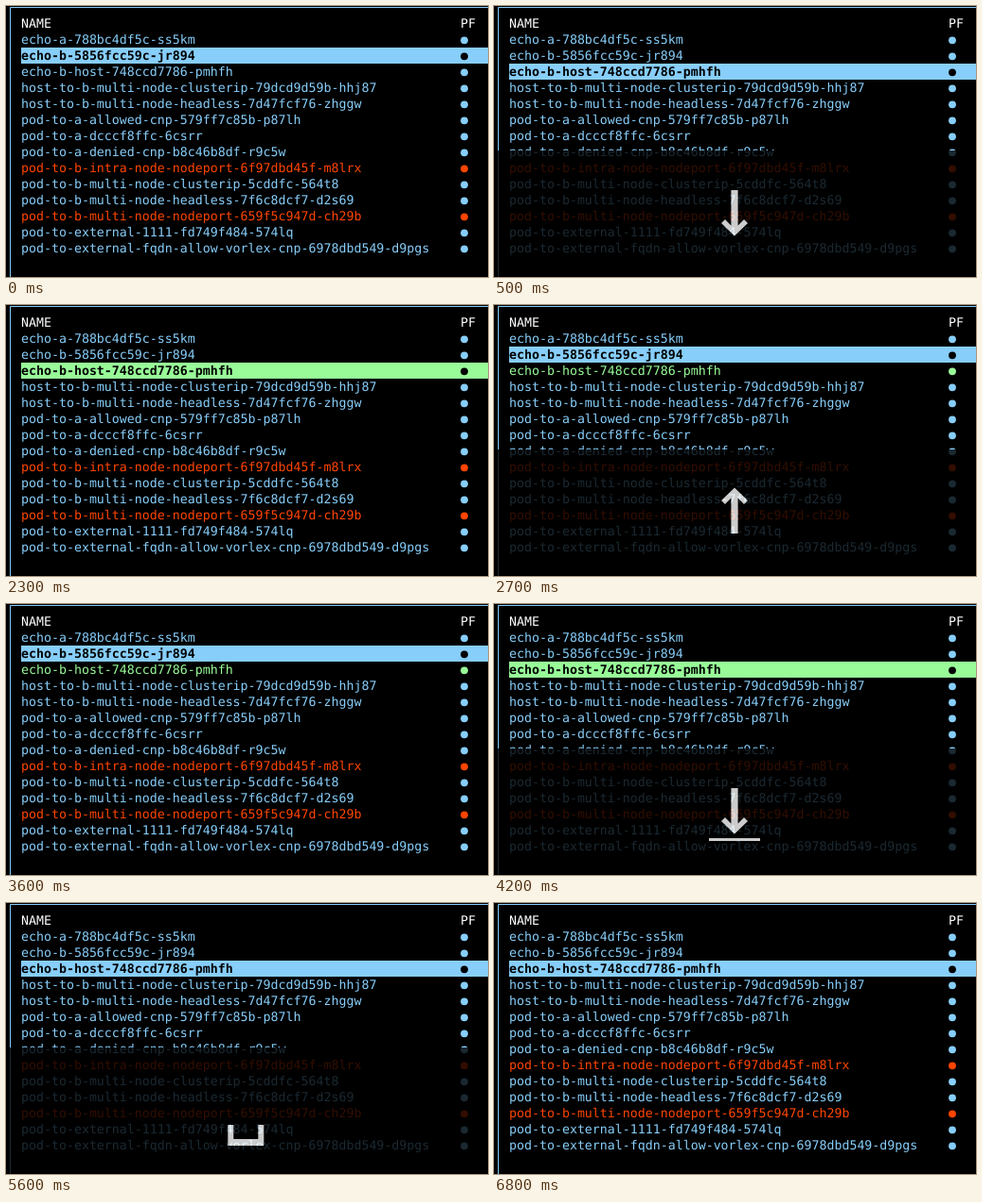
Animation of 509x287 px, one loop 7.1 s. Source, as an HTML page:

```html
<!DOCTYPE html>
<html lang="en">
<head>
<meta charset="utf-8">
<title>Pod list</title>
<style>
  html, body { margin: 0; width: 100%; height: 100%; overflow: hidden; background: #000; }
  svg { display: block; width: 509px; height: 287px; }
  text {
    font-family: "DejaVu Sans Mono", monospace;
    font-size: 13.288px;
    text-rendering: geometricPrecision;
  }
</style>
</head>
<body>
<svg id="stage" viewBox="0 0 509 287">
  <rect width="509" height="287"/>
  <path d="M509 1.5H4.5V287" fill="none" stroke="#87cefa"/>
  <g id="table"></g>
  <g id="keys" opacity=".8">
    <rect y="153" width="509" height="134"/>
    <g fill="#fff">
      <path id="arrow" d="M0 24.5L-14 11L-10 7L-3.6 13.4V-24H3.6V13.4L10 7L14 11Z"/>
      <path id="space" d="M-19 235H-13V250H13V235H19V257H-19Z"/>
      <rect id="line" y="248" height="3"/>
    </g>
  </g>
</svg>
<script>
const LOOP = 7100;
const BLUE = '#87cefa', GREEN = '#98fb98', RED = '#ff4500';
const ROW_H = 17, TOP = 10;
const ECHO_B = 1, HOST = 2;

const pods = [
  'echo-a-788bc4df5c-ss5km',
  'echo-b-5856fcc59c-jr894',
  'echo-b-host-748ccd7786-pmhfh',
  'host-to-b-multi-node-clusterip-79dcd9d59b-hhj87',
  'host-to-b-multi-node-headless-7d47fcf76-zhggw',
  'pod-to-a-allowed-cnp-579ff7c85b-p87lh',
  'pod-to-a-dcccf8ffc-6csrr',
  'pod-to-a-denied-cnp-b8c46b8df-r9c5w',
  'pod-to-b-intra-node-nodeport-6f97dbd45f-m8lrx',
  'pod-to-b-multi-node-clusterip-5cddfc-564t8',
  'pod-to-b-multi-node-headless-7f6c8dcf7-d2s69',
  'pod-to-b-multi-node-nodeport-659f5c947d-ch29b',
  'pod-to-external-1111-fd749f484-574lq',
  'pod-to-external-fqdn-allow-vorlex-cnp-6978dbd549-d9pgs'
];

// Key presses shown in the overlay: [from, to, keys, underline until]
const presses = [
  [300, 1300, 'down', 500],
  [1300, 2300, 'down space', 1500],
  [2700, 3600, 'up', 2700],
  [4200, 5200, 'down', 4400],
  [5400, 6400, 'space', 5600]
];

const $ = id => document.getElementById(id);
const [table, keys, arrow, space, line] = ['table', 'keys', 'arrow', 'space', 'line'].map($);

function set(el, attrs) {
  for (const k in attrs) el.setAttribute(k, attrs[k]);
}

function add(tag, attrs, text = '') {
  const el = document.createElementNS('http://www.w3.org/2000/svg', tag);
  set(el, attrs);
  el.textContent = text;
  return table.appendChild(el);
}

function show(el, on) {
  el.style.display = on ? '' : 'none';
}

add('text', { x: 16, y: TOP + 13, fill: '#fff' }, 'NAME');
add('text', { x: 480, y: TOP + 13, fill: '#fff' }, 'PF');

const rows = pods.map((name, i) => {
  const y = TOP + ROW_H * (i + 1);
  return {
    color: /nodeport/.test(name) ? RED : BLUE,
    bar: add('rect', { x: 16, y, width: 493, height: ROW_H }),
    label: add('text', { x: 16, y: y + 13 }, name),
    dot: add('circle', { cx: 484, cy: y + 9.3, r: 3.9 })
  };
});

const within = (t, from, to) => t >= from && t < to;

function drawTable(t) {
  const selected = t < 300 || within(t, 2700, 4200) ? ECHO_B : HOST;
  const marked = within(t, 1300, 5500);
  rows.forEach((row, i) => {
    const color = i === HOST && marked ? GREEN : row.color;
    const on = i === selected;
    const ink = on ? '#000' : color;
    show(row.bar, on);
    set(row.bar, { fill: color });
    set(row.label, { fill: ink, 'font-weight': on ? 700 : 400 });
    set(row.dot, { fill: ink });
  });
}

function drawKeys(t) {
  const press = presses.find(([from, to]) => within(t, from, to));
  show(keys, press);
  if (!press) return;

  const [, , combo, lineEnd] = press;
  const hasSpace = combo.includes('space');
  const hasArrow = combo !== 'space';
  const arrowX = hasSpace ? 224 : 254;
  const spaceX = hasArrow ? 287.2 : 253.3;
  const flip = combo === 'up' ? -1 : 1;
  show(arrow, hasArrow);
  show(space, hasSpace);
  show(line, t < lineEnd);
  set(arrow, { transform: `translate(${arrowX} ${flip > 0 ? 219 : 218}) scale(1 ${flip})` });
  set(space, { transform: `translate(${spaceX} 0)` });

  const lineX = !hasSpace ? 227 : hasArrow ? 264 : 230;
  set(line, { x: lineX, width: hasSpace ? 47 : 54 });
}

function draw(t) {
  drawTable(t);
  drawKeys(t);
}

const start = performance.now();
function tick() {
  draw((performance.now() - start) % LOOP);
  requestAnimationFrame(tick);
}
draw(0);
requestAnimationFrame(tick);
</script>
</body>
</html>
```
